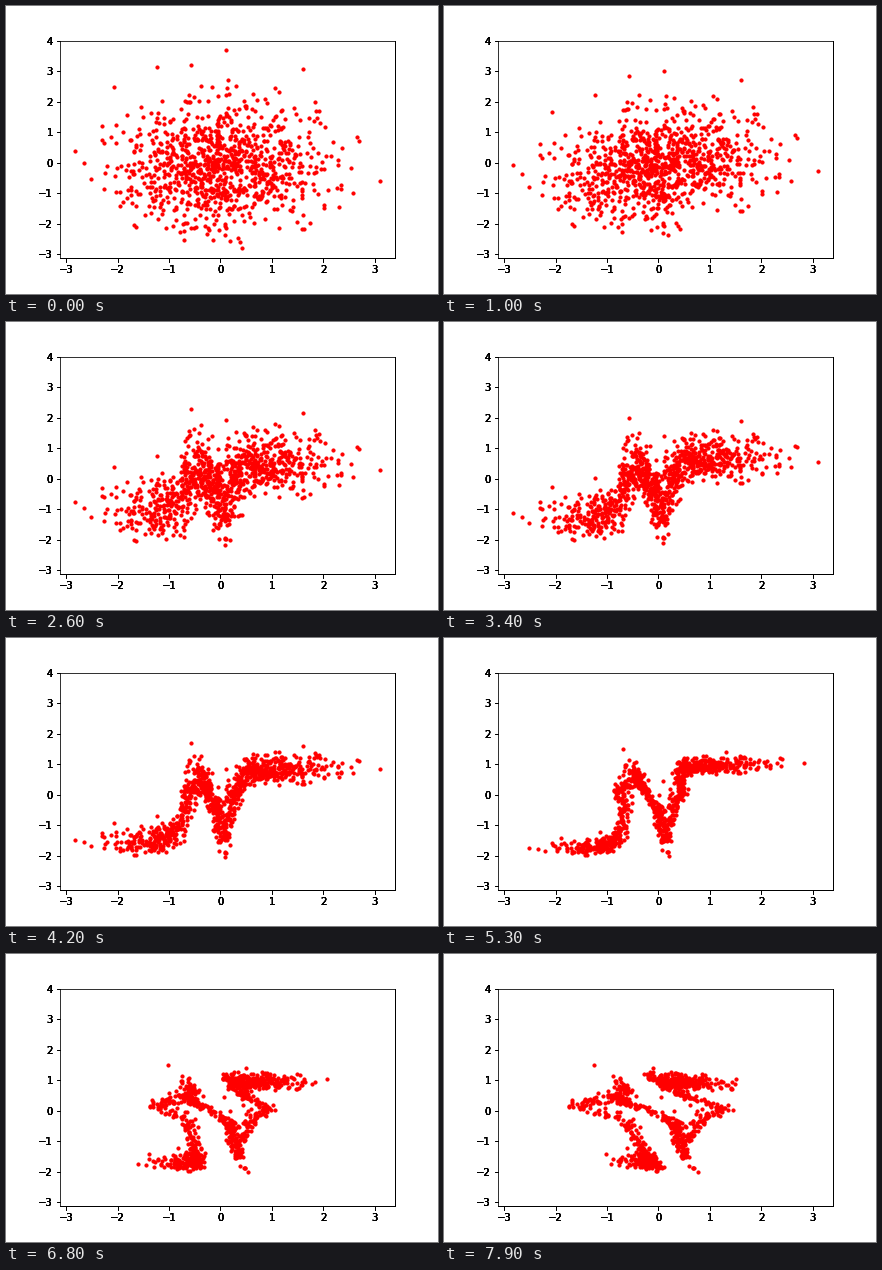
A matplotlib script for the animation above (8 s loop, 432 by 288 pixels).

```python
import numpy as np
import matplotlib.pyplot as plt
from matplotlib.animation import FuncAnimation

FRAMES, STEP_MS, PER_LAYER = 80, 100, 48
COUNT = 1000

# Outermost points, which also set the extent of the cloud
EXTREMES = [(-2.83, .38), (3.1, -.6), (.1, 3.7), (.42, -2.8),
            (-.57, 3.2), (1.6, 3.07), (-1.23, 3.13), (-2.07, 2.48)]


def bump(v, center, width):
    return np.exp(-((v - center) / width) ** 2)


def sample_cloud():
    rng = np.random.default_rng(7)
    p = rng.standard_normal((2 * COUNT, 2))
    x, y = p.T
    inside = p[(x / 2.8) ** 2 + (y / 2.75) ** 2 < 1]
    return np.vstack([EXTREMES, inside[:COUNT - len(EXTREMES)]])


def couple_y(x, y):
    """Scale and shift y depending on x."""
    shift = (-.35 + 1.22 * np.tanh((x + .71) / .22) + .08 * x
             - 1.97 * bump(x, .05, .26))
    scale = .13 + .28 * bump(x, -.64, .2) + .28 * bump(x, .05, .25)
    return x, shift + scale * y


def couple_x(x, y):
    """Scale and shift x depending on y."""
    shift = .3 - .45 * np.tanh((y - .18) / .15) - .32 * y**2 - .207 * y**3
    scale = 1.7 * bump(y, -.25, 1.1) + 2.4 * bump(y, .17, .37)
    return shift + scale * x, y


def flow(points):
    stages = [points]
    for layer in (couple_y, couple_x):
        stages.append(np.column_stack(layer(*stages[-1].T)))
    return stages


def make_axes(fig):
    ax = fig.add_axes([.125, .125, .775, .755])
    ax.set(xlim=(-3.122, 3.394), ylim=(-3.13, 4.015),
           xticks=range(-3, 4), yticks=range(-3, 5))
    ax.patch.set_visible(False)
    return ax


plt.rcParams.update({"font.family": "DejaVu Sans", "font.size": 10})
fig = plt.figure(figsize=(6, 4), dpi=72, facecolor="white")

# Stacked axes give the heavy labels, ticks and lower right border
for _ in range(5):
    make_axes(fig).spines[["top", "left"]].set_visible(False)
ax = make_axes(fig)

stages = flow(sample_cloud())
dots = ax.scatter(*stages[0].T, s=10, color="red")


def update(i):
    layer, step = divmod(i, PER_LAYER)
    t = step / PER_LAYER
    dots.set_offsets((1 - t) * stages[layer] + t * stages[layer + 1])
    return [dots]


# scatter autoscaling must not move the limits
ax.set(xlim=(-3.122, 3.394), ylim=(-3.13, 4.015))

anim = FuncAnimation(fig, update, frames=FRAMES, interval=STEP_MS,
                     repeat=True, repeat_delay=0, blit=False)
plt.show()
```
